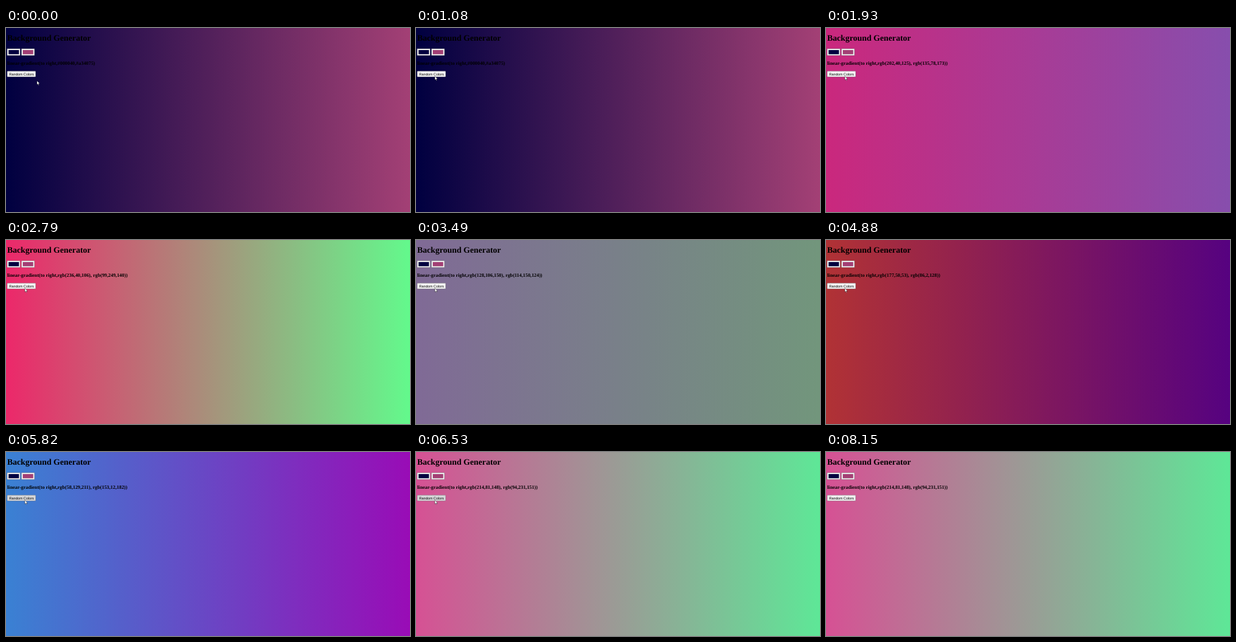
An HTML page for the animation above (8.23 s loop, 600x275 px).

```html
<!DOCTYPE html>
<html lang="en">
<head>
<meta charset="utf-8">
<title>Background Generator</title>
<style>
  html, body { margin: 0; width: 100%; height: 100%; overflow: hidden; }
  svg { display: block; width: 100%; height: 100%; }
  text { text-rendering: geometricPrecision; white-space: pre; }
  .serif { font-family: "Liberation Serif", "Times New Roman", serif; font-weight: bold; }
  .sans { font-family: "Liberation Sans", Arial, sans-serif; }
  .control { fill: #efefef; stroke: #767676; stroke-width: .4; }
</style>
</head>
<body>
<svg viewBox="0 0 600 275" preserveAspectRatio="none">
  <defs>
    <linearGradient id="fade">
      <stop id="from" offset="0"/>
      <stop id="to" offset="1"/>
    </linearGradient>
  </defs>
  <rect width="600" height="275" fill="url(#fade)"/>
  <text class="serif" x="1.7" y="19.2" font-size="12.5">Background Generator</text>

  <rect class="control" x="1.8" y="31" width="19.2" height="10"/>
  <rect x="3.8" y="33" width="15.4" height="6.2" fill="#000040"/>
  <rect class="control" x="23" y="31" width="19.2" height="10"/>
  <rect x="25" y="33" width="15.4" height="6.2" fill="#a34075"/>

  <text class="serif" id="css" x="1.8" y="55.2" font-size="7.35"></text>

  <rect class="control" id="button" x="1.8" y="64.6" width="42.2" height="8.4" rx=".8"/>
  <text class="sans" x="4.8" y="70.6" font-size="5.25">Random Colors</text>

  <path id="cursor" d="M0 0V5.6L1.3 4.4L2.2 6.4L3.1 6L2.2 4.1H4Z"
        fill="#fff" stroke="#000" stroke-width=".35"/>
</svg>
<script>
const LOOP = 8230;
const el = id => document.getElementById(id);

// press: button goes down; at: button is released and the colors change
const looks = [
  { press: 0, at: 0, from: "#000040", to: "#a34075" },
  { press: 1080, at: 1310, from: "rgb(202,40,125)", to: "rgb(135,78,173)" },
  { press: 1930, at: 2160, from: "rgb(236,40,106)", to: "rgb(99,249,140)" },
  { press: 2790, at: 3020, from: "rgb(128,106,150)", to: "rgb(114,150,124)" },
  { press: 3490, at: 3720, from: "rgb(145,243,16)", to: "rgb(197,147,142)" },
  { press: 4100, at: 4330, from: "rgb(177,50,53)", to: "rgb(86,2,128)" },
  { press: 4880, at: 5050, from: "rgb(118,92,134)", to: "rgb(120,104,156)" },
  { press: 5600, at: 5820, from: "rgb(58,129,211)", to: "rgb(153,12,182)" },
  { press: 6370, at: 6530, from: "rgb(214,81,148)", to: "rgb(94,231,151)" }
];

const mix = (a, b, k) => a + (b - a) * k;

// Position on a quadratic curve
function curve(a, c, b, k) {
  return [0, 1].map(i => mix(mix(a[i], c[i], k), mix(c[i], b[i], k), k));
}

// Share of a move done at t, advancing in n equal captures
function stepped(t, start, end, n) {
  if (t < start) return 0;
  const done = Math.floor((t - start) / (end - start) * (n - 1) + 1e-6) + 1;
  return Math.min(done, n) / n;
}

function cursorAt(t) {
  if (t < 450) return curve([46, 79], [37, 76], [28, 73], stepped(t, 70, 300, 4));
  if (t < 7060) return [28, t < 770 ? 72.5 : 72];
  if (t < 7770) return curve([28, 72], [230, -104], [519, 236], stepped(t, 7060, 7450, 6));
  return curve([519, 236], [531, 250], [534, 277], stepped(t, 7770, 8150, 6));
}

function draw(t) {
  const look = looks.findLast(l => t >= l.at);
  el("from").setAttribute("stop-color", look.from);
  el("to").setAttribute("stop-color", look.to);
  const gap = look.at ? ", " : ",";
  el("css").textContent = `linear-gradient(to right,${look.from}${gap}${look.to})`;

  const [x, y] = cursorAt(t);
  el("cursor").setAttribute("transform", `translate(${x} ${y})`);

  const active = looks.some(l => t >= l.press && t < l.at);
  const hover = x < 44 && y > 64 && y <= 73;
  el("button").style.fill = active ? "#f5f5f5" : hover ? "#d6d6d8" : "#efefef";
}

function tick() {
  draw(performance.now() % LOOP);
  requestAnimationFrame(tick);
}
tick();
</script>
</body>
</html>
```
